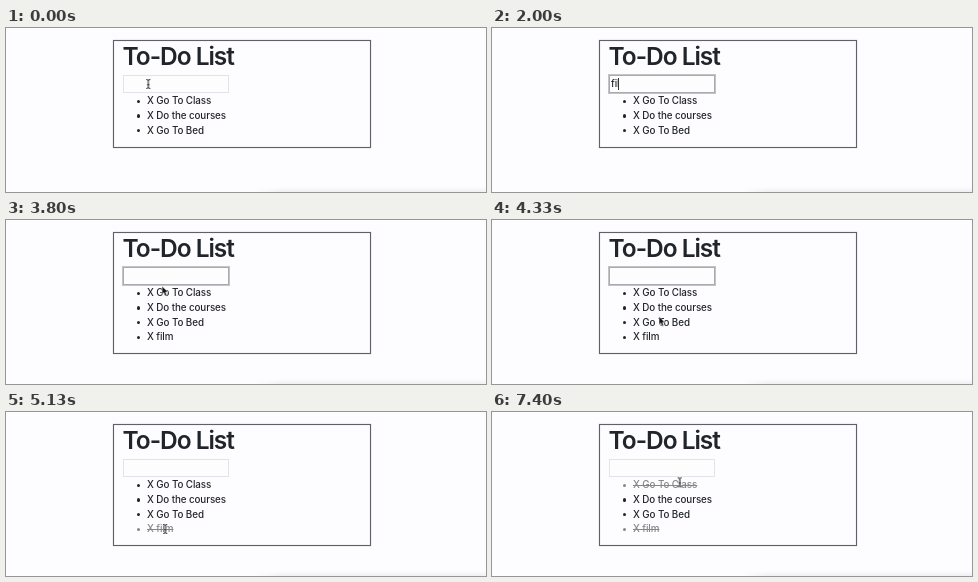
An HTML page that plays this animation: 480x164 px, repeating every 8000 ms.

```html
<!DOCTYPE html>
<html lang="en">
<head>
<meta charset="utf-8">
<title>To-Do List</title>
<style>
@property --arrow { syntax: "<number>"; inherits: true; initial-value: 0; }
html, body { margin: 0; width: 100%; height: 100%; overflow: hidden; }
body {
  position: relative; background: #fdfcfe; color: #212529;
  font: 500 9.8px/14.75px Inter, "Open Sans", sans-serif; letter-spacing: -.08px;
}
.card, h1, ul, .field, .typed, .pointer, .shade { position: absolute; margin: 0; box-sizing: border-box; }
.card, .field, .typed, .done-late, .done, .pointer { animation: 8s step-end infinite; }
.card {
  left: 107px; top: 12px; width: 258px; height: 108px;
  border: 1px solid #606066; box-shadow: 0 0 1px #60606680, inset 0 0 1px #60606680;
  animation-name: grow;
}
h1 { left: 116.6px; top: 13.7px; font-size: 24.5px; line-height: 29.4px; font-weight: 560; letter-spacing: -1.05px; white-space: nowrap; }
.field {
  left: 117px; top: 47px; width: 106px; height: 18px;
  border: 1px solid #e4e3e7; background: #fefdfe; animation-name: focus;
}
.typed {
  left: 119px; top: 50px; width: 1px; height: 12px; line-height: 12px;
  overflow: hidden; white-space: nowrap; border-right: 1px solid transparent;
  animation-name: type;
}
ul { left: 141px; top: 66.1px; padding: 0; list-style: none; white-space: nowrap; }
li { position: relative; height: 14.75px; }
li::before {
  content: ""; position: absolute; left: -10.2px; top: 5.5px;
  width: 3.4px; height: 3.4px; border-radius: 50%; background: #212529;
}
.done { animation-name: strike; }
.done-late { animation-name: strike-late; }
.pointer {
  left: 0; top: 0; width: 12px; height: 14px; overflow: visible;
  animation-name: move, shape, hide;
  animation-timing-function: linear, step-end, step-end;
}
.beam { opacity: calc(1 - var(--arrow)); }
.arrow { opacity: var(--arrow); }
.shade {
  left: 250px; right: 0; bottom: 0; height: 5px;
  background: linear-gradient(#fdfcfe, #f0eff2);
  -webkit-mask: linear-gradient(90deg, transparent, #000 24px);
  mask: linear-gradient(90deg, transparent, #000 24px);
}

@keyframes grow { 0% { height: 108px } 35%, 100% { height: 122px } }
@keyframes focus {
  0%, 62.5%, 100% { border-color: #e4e3e7; box-shadow: none }
  11.625% { border-color: #a9a9ae; box-shadow: 0 0 0 1px #c3c3c8 }
}
@keyframes type {
  0% { width: 1px; border-color: transparent }
  11.625% { width: 1px; border-color: #333 }
  17.5% { width: 1px; border-color: transparent }
  23.375% { width: 5px; border-color: #333 }
  25% { width: 7.5px; border-color: #333 }
  27.5% { width: 10px; border-color: #333 }
  29.125% { width: 19px; border-color: #333 }
  35% { width: 1px; border-color: #333 }
  41.625% { width: 1px; border-color: transparent }
  48.375% { width: 1px; border-color: #333 }
  54.125%, 100% { width: 1px; border-color: transparent }
}
@keyframes strike {
  0% { opacity: 1; text-decoration: none }
  92.5%, 100% { opacity: .55; text-decoration: line-through }
}
@keyframes strike-late {
  0% { opacity: 0; text-decoration: none }
  35% { opacity: 1; text-decoration: none }
  64.125%, 100% { opacity: .55; text-decoration: line-through }
}
@keyframes move {
  0%, .2% { transform: translate(142.3px, 56px) }
  3.375%, 8.3% { transform: translate(151.5px, 55px) }
  8.375%, 45% { transform: translate(151.5px, 54.5px) }
  47.5% { transform: translate(156px, 66px) }
  51.25% { transform: translate(164px, 88px) }
  54.125%, 55% { transform: translate(167px, 96.5px) }
  58.75% { transform: translate(163px, 107px) }
  62.5%, 77.9% { transform: translate(159.2px, 117px) }
  82.5% { transform: translate(182px, 78.5px) }
  85.875%, 100% { transform: translate(187.7px, 70.3px) }
}
@keyframes shape {
  0%, 47.75%, 50.2%, 55.4%, 60.4%, 79%, 80.8%, 83%, 100% { --arrow: 0 }
  47.4%, 49.6%, 52.9%, 59.1%, 78.6%, 80.3%, 82.1% { --arrow: 1 }
}
@keyframes hide {
  0%, 45%, 100% { visibility: visible }
  24.125% { visibility: hidden }
}
</style>
</head>
<body>
<div class="card"></div>
<h1>To-Do List</h1>
<div class="field"></div>
<div class="typed">film</div>
<ul>
  <li class="done">X Go To Class</li>
  <li>X Do the courses</li>
  <li>X Go To Bed</li>
  <li class="done-late">X film</li>
</ul>
<div class="shade"></div>
<svg class="pointer">
  <defs>
    <path id="beam" d="M-2-4.5Q0-4.5 0-3.2Q0-4.5 2-4.5M0-3.2V3.2M-2 4.5Q0 4.5 0 3.2Q0 4.5 2 4.5M-1.2 .8H1.2"/>
  </defs>
  <g class="beam" fill="none">
    <use href="#beam" stroke="#fff" stroke-width="2"/>
    <use href="#beam" stroke="#222"/>
  </g>
  <path class="arrow" d="M0 0V8.4L2 6.6L3.3 9.7L4.9 9L3.6 6H6.2Z" fill="#111" stroke="#fff" stroke-width=".6"/>
</svg>
</body>
</html>
```
